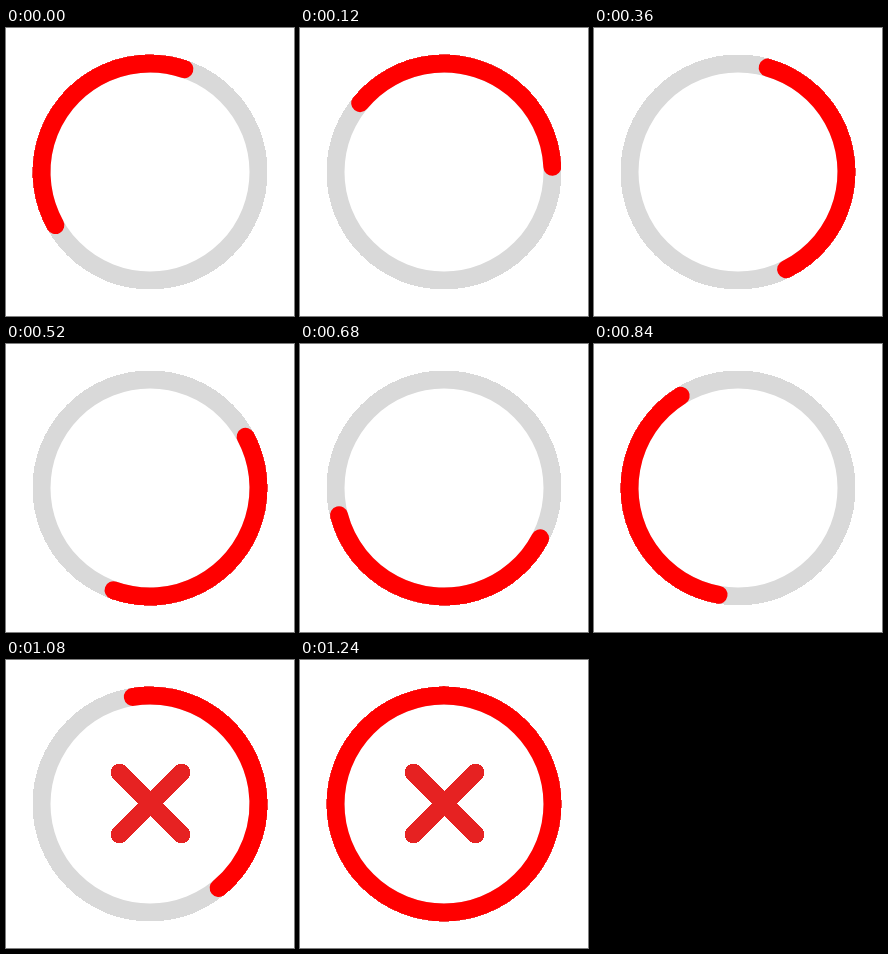
Write an HTML page with a canvas that moves like this. It is 288 px wide and 288 px high and loops after 2040 ms.

```html
<!DOCTYPE html>
<html lang="en">
<head>
<meta charset="utf-8">
<title>Error indicator</title>
<style>
  html, body { margin: 0; width: 100%; height: 100%; overflow: hidden; background: #fff; }
  canvas { display: block; width: 288px; height: 288px; }
</style>
</head>
<body>
<canvas id="stage" width="288" height="288"></canvas>
<script>
const SIZE = 288, CENTER = SIZE / 2, RADIUS = 108.5, WIDTH = 18;
const LOOP = 2040, STEP = 40, LAST_STEP = 31;
const ctx = document.getElementById('stage').getContext('2d', { willReadFrequently: true });

const clamp = (x, lo, hi) => Math.min(Math.max(x, lo), hi);

// Degrees clockwise from the top: a quick start that settles, then speeds up
const spin = n => -119.3 + 45.1 * (1 - Math.exp(-n / 1.465)) + 9.8 * n + 0.000302 * n ** 4;

// The tail stops at the top while the head runs on to close the ring
const tail = n => Math.min(spin(n), 360);
const head = n => Math.min(spin(n) + 137.8 + 1.78 * Math.max(n - 24.4, 0) ** 2, 720);

function arc(from, to, color, radius = RADIUS) {
  const rad = deg => (deg - 90) * Math.PI / 180;
  ctx.beginPath();
  ctx.arc(CENTER, CENTER, radius, rad(from), rad(to));
  ctx.strokeStyle = color;
  ctx.stroke();
}

function cross(scale) {
  if (scale <= 0) return;
  const h = 31;
  ctx.save();
  ctx.translate(144.5, 143.5);
  ctx.scale(scale, scale);
  ctx.beginPath();
  ctx.moveTo(-h, -h);
  ctx.lineTo(h, h);
  ctx.moveTo(h, -h);
  ctx.lineTo(-h, h);
  ctx.strokeStyle = '#e62222';
  ctx.stroke();
  ctx.restore();
}

// Make every pixel fully opaque or fully clear
function hardenEdges() {
  const image = ctx.getImageData(0, 0, SIZE, SIZE);
  for (let i = 3; i < image.data.length; i += 4) {
    image.data[i] = image.data[i] > 126 ? 255 : 0;
  }
  ctx.putImageData(image, 0, 0);
}

function draw(time) {
  const n = Math.min(Math.floor((time % LOOP) / STEP), LAST_STEP);
  ctx.clearRect(0, 0, SIZE, SIZE);
  ctx.lineCap = 'round';
  ctx.lineWidth = WIDTH;
  arc(0, 360, '#fff', RADIUS - WIDTH / 2); // keeps the inner edge smooth
  arc(0, 360, '#d9d9d9');
  arc(tail(n), head(n), '#f00');
  const grow = clamp((n - 22) / 4, 0, 1);
  cross(1 - (1 - grow) ** 2);
  hardenEdges();
}

let start;
function tick(now) {
  start ??= now;
  draw(now - start);
  requestAnimationFrame(tick);
}
draw(0);
requestAnimationFrame(tick);
</script>
</body>
</html>
```
